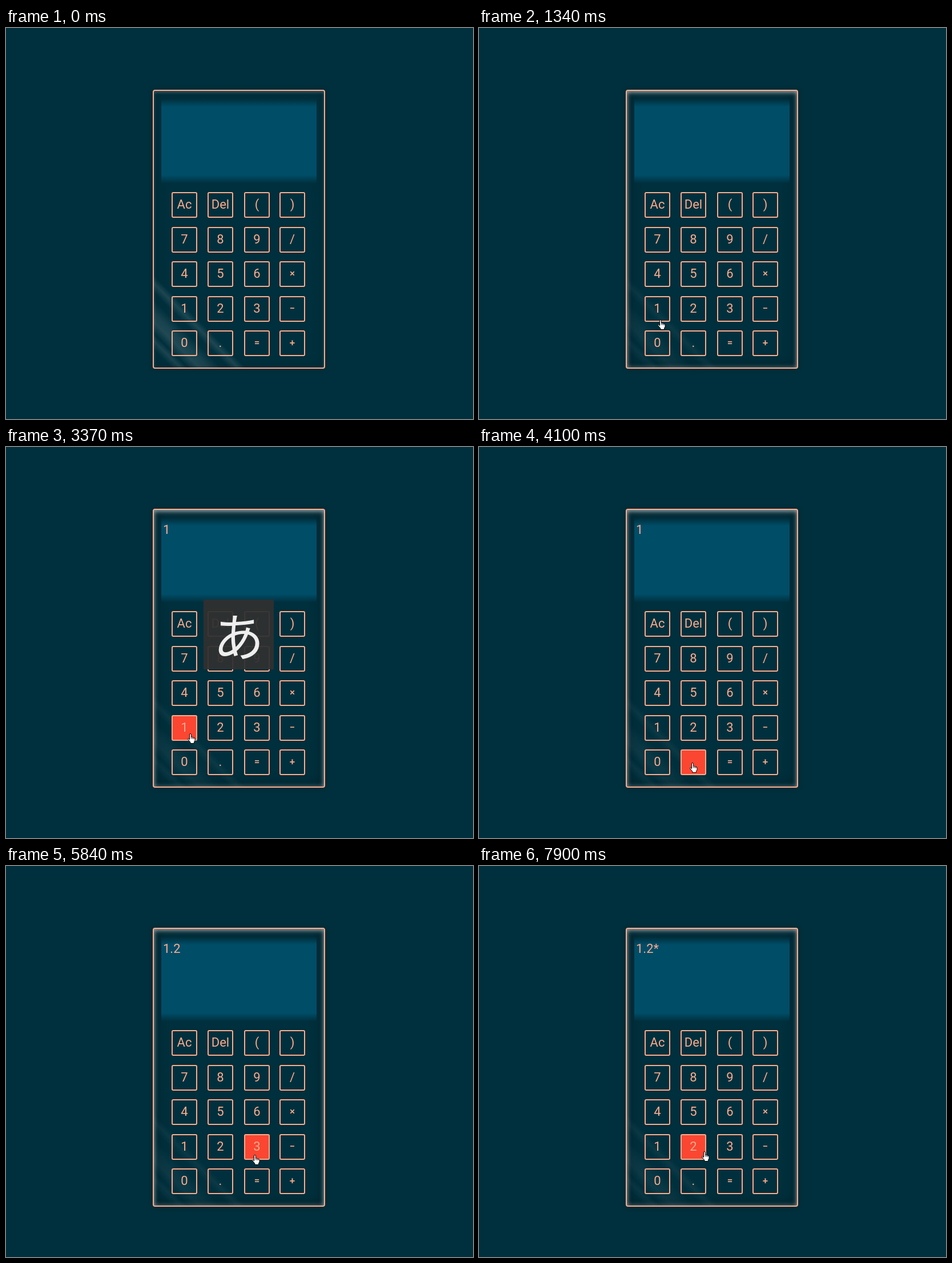
Animation of 818x684 px, one loop 8 s. Source, as an HTML page:

```html
<!DOCTYPE html>
<html lang="en">
<head>
<meta charset="utf-8">
<style>
  html, body { margin: 0; width: 100%; height: 100%; overflow: hidden; background: #00303d; }
  body { position: relative; color: #fbac8d; font: 22px/39px Roboto, sans-serif; }
  body div, body svg { position: absolute; box-sizing: border-box; }
  #case {
    left: 257px; top: 108px; width: 302px; height: 488px; border: 2px solid; border-radius: 4px;
    box-shadow: 0 0 9px #0005, inset 0 3px 5px #fff3, inset 0 0 22px #0003;
  }
  #glow {
    inset: 0; border-radius: 2px;
    box-shadow: inset 0 4px 8px #fff4, inset 0 0 9px #fff5, inset 0 0 26px #0004;
  }
  #shine {
    left: 0; bottom: 0; width: 170px; height: 170px;
    background: linear-gradient(45deg, #fff0 22px, #ffffff1a 33px, #fff0 42px,
      #ffffff0a 46px, #ffffff20 56px, #ffffff18 68px, #fff0 84px, #fff0 93px, #ffffff1c 104px, #fff0 114px);
  }
  #screen {
    left: 272px; top: 122px; width: 272px; height: 150px;
    background: linear-gradient(#004d6800 2px, #004d68 16px, #004d68 135px, #004d6800);
  }
  #readout { left: 275px; top: 125px; white-space: pre; }
  .key {
    width: 45px; height: 45px; border: 2px solid; border-radius: 3px;
    text-align: center; box-shadow: 0 0 4px #0003;
  }
  .key.hover { background: #fb4632; }
  .small { font-size: 17px; font-weight: 500; }
  #ime {
    left: 346px; top: 267px; width: 123px; height: 122px; background: #303030f0; color: #eee;
    font: 89px/122px "Noto Sans CJK JP", "Noto Sans CJK", sans-serif; text-align: center;
  }
  svg { left: 0; top: 0; overflow: visible; fill: #fff; stroke: #000; stroke-linejoin: round; }
</style>
</head>
<body>
<div id="case"><div id="shine"></div><div id="glow"></div></div>
<div id="screen"></div>
<div id="readout"></div>
<div id="ime" lang="ja">あ</div>
<svg id="arrow" width="12" height="19"><path d="M.5 .5V16l3.6-3.4 2.5 5.7 2.3-1-2.5-5.6h5z"/></svg>
<svg id="hand" width="14" height="18">
  <path d="M3.5 11V2q0-1.5 1.4-1.5T6.3 2v4.3q1.4-.8 2.3.6 1.4-.6 2.1.7 2.2-.4 2.3 1.7v3.2l-1.6 3v2H5v-1.8L.9 10.8Q0 9 1.6 8.8q1 0 1.9 2.2z"/>
  <path d="M6.3 6.3v3.2M8.6 7v2.8M10.7 7.7v2.4" stroke-width=".8"/>
</svg>
<script>
const LOOP = 8000;
const $ = id => document.getElementById(id);

// Pointer hot spot: [time, x, y], held until the next entry
const moves = [
  [500, 770, 633], [640, 690, 590], [780, 610, 555], [920, 535, 532],
  [1060, 468, 522], [1200, 390, 520], [1340, 317, 510], [1470, 299, 500],
  [1630, 295, 496], [1930, 300, 495], [2060, 308, 496], [3370, 322, 501],
  [3520, 345, 524], [3650, 373, 552], [4690, 374, 540], [4830, 376, 522],
  [4960, 378, 505], [5690, 403, 504], [5840, 435, 505], [6000, 470, 480],
  [6130, 485, 452], [6280, 488, 444], [6430, 489, 441], [7170, 470, 455],
  [7320, 440, 461], [7470, 404, 494], [7900, 394, 499]
];
const typed = [[0, ''], [3370, '1'], [4390, '1.'], [5090, '1.2'], [6730, '1.2*']];
const imeFade = [[0, 0], [3370, 1], [3950, .5], [4100, 0]];

const latest = (list, t) => list.findLast(entry => entry[0] <= t);

const keys = 'Ac Del ( ) 7 8 9 / 4 5 6 × 1 2 3 − 0 . = +'.split(' ').map((label, i) => {
  const el = document.createElement('div');
  const x = 290 + i % 4 * 63 + (i % 4 === 2), y = Math.round(287.4 + (i >> 2) * 60.4);
  el.className = '×−=+'.includes(label) ? 'key small' : 'key';
  el.textContent = label;
  el.style.left = x + 'px';
  el.style.top = y + 'px';
  document.body.insertBefore(el, $('ime'));
  return { el, x, y };
});

function render(t) {
  const [since, x, y] = latest(moves, t) || [0, -100, -100];
  let overKey = false;
  for (const key of keys) {
    const dx = x - key.x, dy = y - key.y;
    const inside = dx >= 0 && dx < 45 && dy >= 0 && dy < 45;
    overKey ||= inside;
    key.el.classList.toggle('hover', inside && dy < 40);
  }
  $('hand').style.display = overKey ? '' : 'none';
  $('arrow').style.display = overKey ? 'none' : '';
  $('hand').style.transform = `translate(${x - 4}px, ${y}px)`;
  $('arrow').style.transform = `translate(${x}px, ${y}px)`;

  const glow = Math.max(0, Math.min(1, (since - 780) / 420));
  $('glow').style.opacity = glow;
  $('shine').style.opacity = 1 - .6 * glow;
  $('readout').textContent = latest(typed, t)[1];
  $('ime').style.opacity = latest(imeFade, t)[1];
}

const start = performance.now();
function tick() {
  render((performance.now() - start) % LOOP);
  requestAnimationFrame(tick);
}
tick();
</script>
</body>
</html>
```
